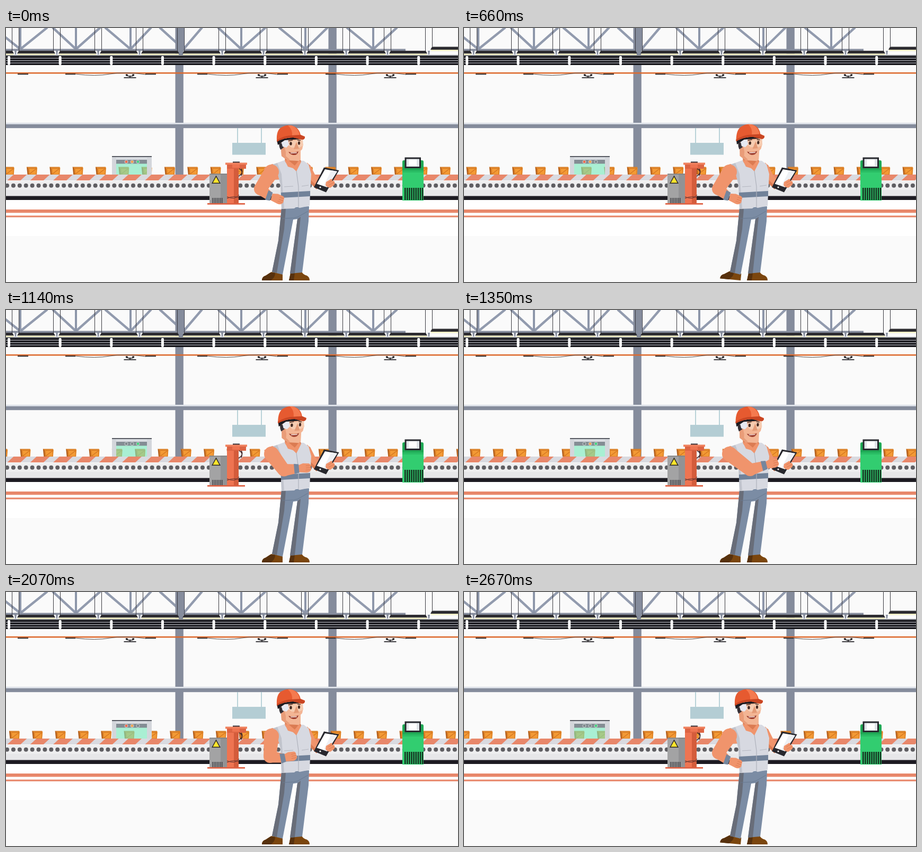
An HTML page with a canvas that plays this animation: 853 by 480 pixels, repeating every 2700 ms.

```html
<!DOCTYPE html>
<html lang="en">
<head>
<meta charset="utf-8">
<title>Factory line</title>
<style>
html, body { margin: 0; width: 100%; height: 100%; overflow: hidden; background: #fafafa; }
canvas { display: block; width: 853px; height: 480px; }
</style>
</head>
<body>
<canvas id="stage" width="853" height="480"></canvas>
<script>
const LOOP = 2700, STEP = 30, PITCH = 43.33;
const STEEL = '#858c9c', SKIN = '#f0946c', SKIN_DARK = '#db7b52', RED = '#e8876a', INK = '#1b1a20';
const ctx = document.getElementById('stage').getContext('2d');

function rect(x, y, w, h, color) {
  ctx.fillStyle = color;
  ctx.fillRect(x, y, w, h);
}

function poly(color, ...p) {
  ctx.fillStyle = color;
  ctx.beginPath();
  for (let i = 0; i < p.length; i += 2) ctx.lineTo(p[i], p[i + 1]);
  ctx.closePath();
  ctx.fill();
}

function line(color, width, ...p) {
  ctx.strokeStyle = color;
  ctx.lineWidth = width;
  ctx.beginPath();
  for (let i = 0; i < p.length; i += 2) ctx.lineTo(p[i], p[i + 1]);
  ctx.stroke();
}

function oval(x, y, rx, ry, color) {
  ctx.fillStyle = color;
  ctx.beginPath();
  ctx.ellipse(x, y, rx, ry, 0, 0, Math.PI * 2);
  ctx.fill();
}

function shape(color, d) {
  ctx.fillStyle = color;
  ctx.fill(new Path2D(d));
}

function curve(color, width, d) {
  ctx.strokeStyle = color;
  ctx.lineWidth = width;
  ctx.stroke(new Path2D(d));
}

const linear = u => u;
const smooth = u => u * u * (3 - 2 * u);

// Keys are [time, value or array of values].
function track(keys, t, ease = smooth) {
  let i = 1;
  while (i < keys.length - 1 && keys[i][0] < t) i++;
  const [t0, a] = keys[i - 1], [t1, b] = keys[i];
  const u = ease(Math.min(1, Math.max(0, (t - t0) / (t1 - t0))));
  return Array.isArray(a) ? a.map((v, j) => v + (b[j] - v) * u) : a + (b - a) * u;
}

const BELT = [[0, 0], [660, 95.3], [900, 128.8], [1350, 188.8], [1620, 211.2],
  [2070, 270.2], [2670, 341.8], [2700, 346.64]];

const HEAD = [[0, 0], [660, 0.88], [900, 1], [1350, 0.55], [1620, 0], [2700, 0]];

// Elbow, wrist and hand positions.
const ON_HIP = [480, 304, 496, 317, 513, 323];
const ON_TABLET = [540, 302, 566, 294, 582, 290];
const AT_CHIN = [521, 305, 545, 288, 555, 272];
const LOWERED = [498, 311, 522, 314, 537, 311];
const ARM = [[0, ON_HIP], [960, ON_HIP], [1230, ON_TABLET], [1380, ON_TABLET],
  [1590, AT_CHIN], [1800, AT_CHIN], [2070, LOWERED], [2220, ON_HIP], [2700, ON_HIP]];

const LIGHTS = [
  { x: 227, color: '#f0694a', on: [[0, 1100], [1900, 2500]] },
  { x: 238, color: '#f2a14b', on: [[0, 760], [1150, 1480], [1900, 2400]] },
  { x: 249, color: '#3fd27c', on: [[0, 400], [780, 1480], [2400, 2700]] }
];

function drawTruss() {
  const bays = [[27, -24, 78], [132, 88, 178], [235, 187, 274], [335, 290, 370],
    [444, 400, 490], [565, 515, 607], [693, 643, 738]];
  for (const [x, left, right] of bays) {
    line('#929bae', 4.5, left, -1, x, 40, right, -1);
    line('#8d96a9', 4, x, 0, x, 41);
  }
  rect(0, 39.5, 754, 3.5, STEEL);
}

function drawLamps() {
  for (let k = -1; k < 11; k++) {
    const x = 21 + k * 78, last = k === 10, y = last ? 35.5 : 43;
    line('#3a3a40', 1, x + 3.5, 0, x + 3.5, y);
    line('#3a3a40', 1, x + 68.5, 0, x + 68.5, y);
    poly('#2c2b30', x + 3, y, x + 69, y, x + 72, y + 5.5, x, y + 5.5);
    rect(x + 1, y + 5.5, 70, 2.5, '#f4f0c4');
    if (!last) poly(STEEL, x + 73, 43, x + 77, 43, x + 76, 50, x + 74, 50);
  }
}

function drawRails() {
  rect(0, 51, 853, 2, '#777a80');
  rect(0, 53, 853, 17, '#15151a');
  for (const y of [56.5, 61, 65.5]) rect(0, y, 853, 1.2, '#b8bac0');
  for (let x = 5.5; x < 853; x += 96.65) {
    ctx.fillStyle = '#fff';
    ctx.beginPath();
    ctx.roundRect(x - 2.5, 53, 5, 17, 2);
    ctx.fill();
  }
  rect(0, 83.8, 853, 2.6, '#dd6a2e');
  for (const x of [234, 483, 725]) {
    curve('#55504f', 1, `M${x - 103} 87 Q${x - 65} 92 ${x - 38} 87 T${x + 30} 88`);
    rect(x - 122, 86, 19, 2.2, '#3d3838');
    rect(x + 29, 86, 20, 2.2, '#3d3838');
    line('#2b2a2e', 1.5, x - 8, 88, x - 3, 91, x + 4, 91, x + 8, 88);
    oval(x - 6, 89, 2, 2, '#2b2a2e');
    oval(x + 6, 89, 2, 2, '#2b2a2e');
    rect(x - 11.5, 93, 23, 1.8, '#2b2a2e');
    rect(x - 1, 90, 2, 4, '#2b2a2e');
  }
  rect(22, 86, 20, 2.2, '#3d3838');
}

function drawHall() {
  rect(0, 0, 853, 480, '#fafafa');
  drawTruss();
  for (const x of [319.5, 608.5]) rect(x, 0, 15.3, 278, STEEL);
  rect(0, 179, 853, 3, '#dde1e8');
  rect(0, 182, 853, 7.2, STEEL);
  drawLamps();
  drawRails();
  for (const x of [437, 482]) line('#b9d2d8', 2, x, 189, x, 218);
  rect(427, 217, 63, 22.5, '#b4cdd4');
}

function drawBox(x) {
  poly('#b45f1c', x, 262.5, x + 4, 264, x + 5, 278, x + 1.5, 277);
  poly('#d77e27', x, 262.5, x + 19, 262.5, x + 20, 265, x + 3, 265);
  poly('#f39a35', x + 3, 264.5, x + 20, 264.5, x + 19, 278, x + 4, 278);
  line('#d47722', 1.1, x + 4.3, 265.5, x + 18.7, 265.5, x + 18, 277, x + 5, 277, x + 4.3, 265.5);
  line('#d47722', 1.4, x + 5, 276, x + 18, 266);
}

function drawScanner(t) {
  ctx.globalAlpha = 0.62;
  rect(208, 249, 58, 29, '#78e9bc');
  ctx.globalAlpha = 1;
  rect(200, 243, 75, 6, '#d9dce1');
  rect(200, 243, 8, 35, '#d3d6db');
  rect(266, 243, 9, 35, '#d3d6db');
  rect(200, 242, 75, 1.8, '#4a4d55');
  rect(208, 249, 58, 7.5, '#848d94');
  for (const { x, color, on } of LIGHTS) {
    const lit = on.some(([a, b]) => t >= a && t < b);
    oval(x, 252.8, 3.4, 3.4, '#c5cacd');
    oval(x, 252.8, 2.4, 2.4, lit ? color : '#7b8589');
  }
}

function drawConveyor(t) {
  const offset = track(BELT, t, linear) % PITCH;
  for (let x = 39 + offset - 2 * PITCH; x < 860; x += PITCH) drawBox(x);
  drawScanner(t);

  rect(0, 277, 853, 12, '#d9dae0');
  for (let x = -42; x < 860; x += PITCH) poly(RED, x + 13, 277, x + 38, 277, x + 25, 289, x, 289);
  rect(0, 288, 853, 29.5, '#eeeeef');
  rect(0, 288, 853, 1.2, '#fafafa');
  for (let x = 2; x < 860; x += 11.9) oval(x, 297.8, 4, 4, '#5f5e62');
  rect(0, 306, 853, 11.5, '#e7e7e9');
  rect(0, 317.5, 853, 7.5, '#1d1b22');
  rect(0, 325, 853, 68, '#fff');
  rect(0, 343, 853, 6.3, RED);
  rect(0, 354.5, 853, 3.2, RED);
}

function drawPress() {
  rect(417, 262, 22, 70, '#ee7451');
  rect(430, 266, 9, 66, '#d45c3b');
  rect(428, 252.5, 13, 3, '#39343a');
  rect(414, 254.5, 41, 4, '#f0815e');
  rect(417, 258, 36, 8, '#dd6443');
  rect(427, 258, 14, 6, '#ee7451');
  curve('#47292b', 1.6, 'M440 266 Q448 269 444 279 M444 266 Q449 274 439 280');
  curve('#5a302e', 1, 'M417 319 Q433 326 440 315 M417 322 Q431 316 440 321');
  rect(384, 275.5, 33, 56, '#a3a3a4');
  rect(405, 275.5, 12, 56, '#929294');
  rect(384, 275.5, 33, 1.5, '#7f8082');
  poly('#262522', 396.5, 278.5, 405, 294, 388, 294);
  poly('#ffe52c', 396.5, 281.5, 402.7, 292.5, 390.3, 292.5);
  for (let x = 389; x < 408; x += 3) rect(x, 321, 1.5, 10, '#454548');
  rect(380, 331, 71, 2.7, '#de5f40');
}

function drawTerminal() {
  rect(748, 263, 40, 63, '#32cd70');
  shape('#1fa955', 'M748 272 V253 Q748 250 751 250 H785 Q788 250 788 253 V272 Z');
  rect(748, 269, 40, 4, '#29bd64');
  rect(752.5, 244.5, 30.5, 20.5, '#27282e');
  rect(755.5, 247.5, 24.5, 14.5, '#dfe4e8');
  rect(760, 248.5, 15, 12.5, '#fff');
  for (let x = 752; x < 785; x += 4.1) rect(x, 302, 2.5, 23, '#15301f');
}

function drawLegs(t) {
  const [peak, period] = t < 1080 ? [660, 450] : [2670, 400];
  const still = t > 1080 && t < 1680;
  const tap = still ? 0 : Math.max(0, Math.cos((t - peak) / period * 2 * Math.PI));

  ctx.save();
  ctx.translate(521, 477);
  ctx.rotate(tap * 0.1);
  ctx.translate(-521, -477);
  shape('#7b460e', 'M483 477 Q483 470 490 468 L501 461 L522 464 V477 Z');
  shape('#57310d', 'M483 477 Q483 470 490 468 L499 462 L508 463 Q508 471 500 477 Z');
  ctx.restore();
  shape('#7b460e', 'M534 477 L537 463 L558 460 Q560 466 568 468 Q573 471 573 477 Z');
  shape('#57310d', 'M534 477 L537 463 L545 463 L543 477 Z');

  poly('#7b8ca4', 520, 340, 572, 337, 571, 365, 559, 462, 536, 464, 550, 361, 542, 362, 522, 466, 502, 461, 514, 402);
  poly('#686d79', 520, 340, 528, 341, 525, 380, 511, 463, 502, 461, 514, 402);
  poly('#686d79', 550, 361, 556, 357, 545, 463, 536, 464);
  line('#697a91', 1, 522, 360, 543, 359, 551, 357, 570, 346);
}

function drawTorso() {
  poly(SKIN_DARK, 565, 255, 574, 259, 581, 276, 594, 291, 586, 305, 574, 293);
  poly(SKIN, 568, 254, 575, 261, 584, 279, 597, 292, 590, 302, 575, 287);
  poly(SKIN, 487, 265, 502, 257, 522, 258, 522, 286, 500, 287);
  poly('#d7d9e1', 503, 258, 528, 249, 562, 251, 571, 258, 576, 276, 574, 313, 573, 336, 554, 340, 549, 337, 544, 341, 520, 342, 518, 296, 513, 276);
  poly('#c1c4cd', 503, 258, 512, 255, 520, 276, 525, 341, 520, 342, 518, 296, 513, 276);
  poly('#718299', 519, 311, 574, 308, 574, 318, 519, 321);
  poly(SKIN_DARK, 526, 246, 554, 246, 557, 252, 547, 269, 527, 253);
  poly(SKIN, 526, 250, 533, 250, 545, 260, 553, 250, 557, 253, 548, 271, 542, 265, 532, 262);
  line('#aeb1bb', 1.2, 548, 270, 552, 300, 552, 338);
  line('#b4b7c0', 1, 525, 300, 542, 299);
  line('#b4b7c0', 1, 558, 299, 571, 297);
}

function drawTablet() {
  poly('#27272d', 600, 263.5, 628.5, 269, 604, 310.5, 581, 301);
  poly('#fff', 602, 267, 625, 271, 606, 301, 586.5, 294.5);
  poly('#eef0f4', 614, 269, 625, 271, 606, 301, 599, 298.5);
  oval(593, 301, 1.6, 1.6, '#fff');
  shape(SKIN, 'M604 291 L614 285 Q617 286 615 289 L619 289 Q622 293 619 297 L612 302 Q605 301 603 297 Z');
  line(SKIN_DARK, 1, 608, 293, 616, 288);
  line(SKIN_DARK, 1, 609, 297, 619, 292);
}

function drawHead(t) {
  const k = track(HEAD, t);
  ctx.save();
  ctx.translate(538, 252);
  ctx.transform(1, 0, -0.075 * k, 1 + 0.033 * k, 0, 0);
  ctx.translate(-538, -252);

  shape('#f3b594', 'M518 211 L557 208 L557 218 L561 219 L559 229 L556 232 L556 248 Q554 252 549 251 L531 250 L520 242 L519 230 Z');
  shape('#e99c78', 'M518 222 L525 224 L528 234 L528 242 L536 249 L531 250 L520 242 L519 230 Z');
  poly('#353036', 515, 218, 522, 217, 524, 226, 518, 230, 516, 225);
  poly('#e7e9f1', 519, 214, 532, 211, 534, 221, 529, 226, 522, 224);
  poly('#f6ccb1', 534, 214, 560, 211, 561, 222, 554, 226, 539, 226, 534, 222);
  poly('#e39a76', 548, 215, 553, 228, 543, 229);
  oval(537.5, 218.5, 2.2, 3.2, '#432820');
  oval(553, 217.5, 2.1, 3.2, '#432820');
  line('#55382e', 1.6, 533, 213.5, 541, 212);
  line('#55382e', 1.6, 550, 212, 556, 212.5);
  shape('#9b3b2b', 'M533 234 Q544 237 552 233 Q550 241 542 240 Q536 239 533 234 Z');
  line('#fff', 1.2, 537, 236.3, 549, 235.8);

  shape(INK, 'M511 211 L557 204 L557 210 L526 212 L513 221 Z');
  shape('#e65a30', 'M511 212 Q510 194 519 188 Q533 180 546 187 Q554 192 556 202 L564 205 Q565 210 559 211 L542 207 Q525 207 511 215 Z');
  shape('#f47a4f', 'M532 184 Q541 183 547 189 Q553 194 554 202 L540 203 Q541 192 532 184 Z');
  shape('#c94623', 'M511 212 Q525 203 540 203 L556 202 L564 206 Q564 211 559 211 L542 207 Q525 207 511 215 Z');
  ctx.restore();
}

function limb(x0, y0, x1, y1, w0, w1, color) {
  const a = Math.atan2(y1 - y0, x1 - x0), nx = -Math.sin(a), ny = Math.cos(a);
  poly(color, x0 + nx * w0, y0 + ny * w0, x1 + nx * w1, y1 + ny * w1,
    x1 - nx * w1, y1 - ny * w1, x0 - nx * w0, y0 - ny * w0);
}

function drawArm(t) {
  const [ex, ey, wx, wy, hx, hy] = track(ARM, t);
  const sx = 501, sy = 272;
  oval(sx, sy, 14, 14, SKIN);
  limb(sx, sy, ex, ey, 14, 12, SKIN);
  oval(ex, ey, 12, 12, SKIN);
  limb(ex, ey, wx, wy, 11.5, 8.5, SKIN);

  const a = Math.atan2(hy - wy, hx - wx);
  ctx.save();
  ctx.translate(hx, hy);
  ctx.rotate(a);
  shape(SKIN, 'M-13 -6 L-3 -9 L8 -8 Q12 -6 11 -2 L12 3 Q10 9 3 9 L-12 7 Z');
  line(SKIN_DARK, 1, 2, -4, 10, -4);
  line(SKIN_DARK, 1, 2, 0, 11, 0);
  line(SKIN_DARK, 1, 1, 4, 10, 4);
  ctx.restore();
  limb(wx - 4 * Math.cos(a), wy - 4 * Math.sin(a), wx + 5 * Math.cos(a), wy + 5 * Math.sin(a), 9.5, 8, '#75869d');
}

function draw(t) {
  drawHall();
  drawConveyor(t);
  drawPress();
  drawTerminal();
  drawLegs(t);
  drawTorso();
  drawTablet();
  drawHead(t);
  drawArm(t);
}

const start = performance.now();
function tick() {
  const t = (performance.now() - start) % LOOP;
  draw(Math.floor(t / STEP) * STEP);
  requestAnimationFrame(tick);
}
tick();
</script>
</body>
</html>
```
